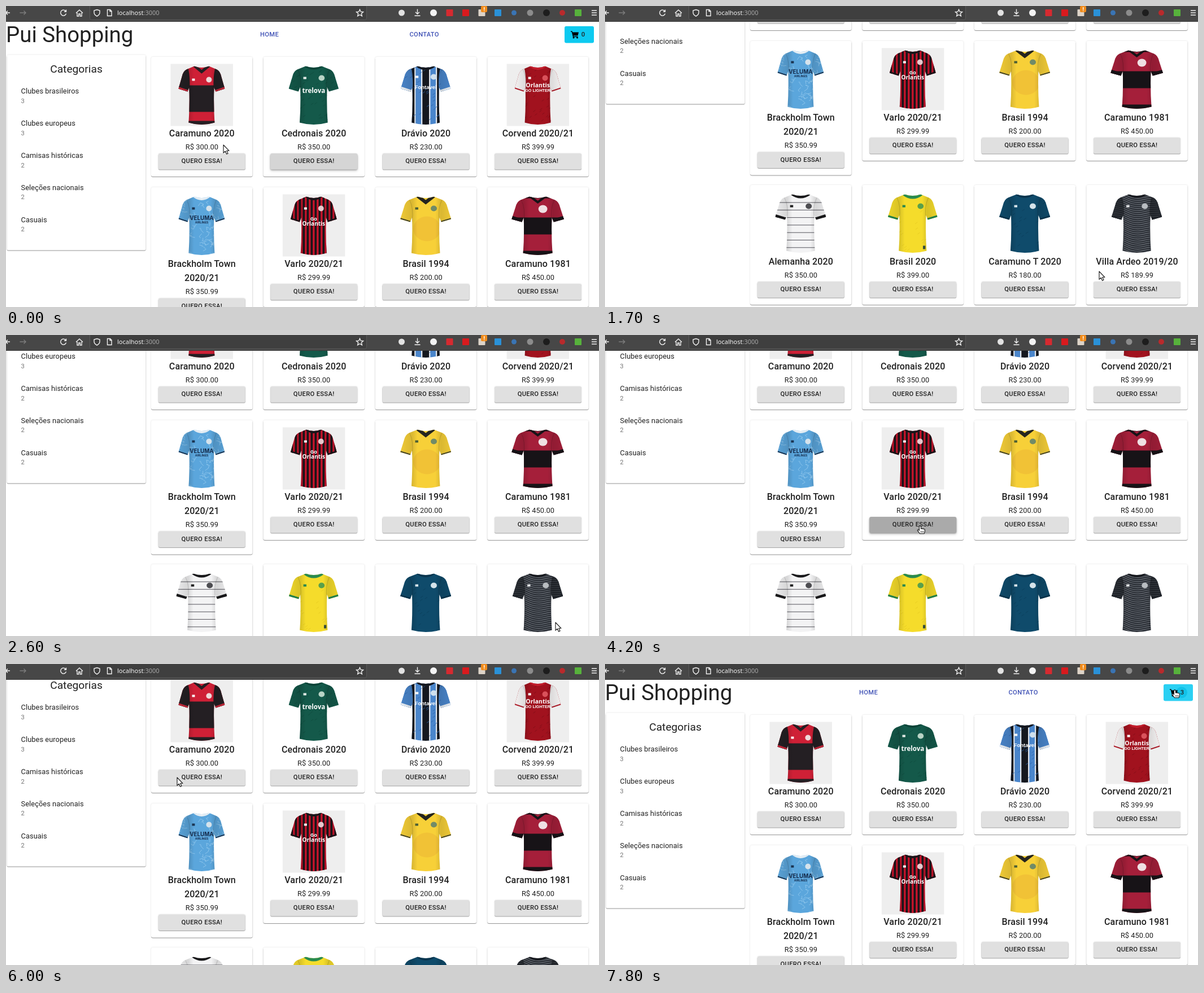
Write an HTML page that moves like this. It is 1050 by 533 pixels and loops after 8 s.

```html
<!DOCTYPE html>
<html lang="pt">
<head>
<meta charset="utf-8">
<title>Pui Shopping</title>
<style>
html,body{margin:0;width:100%;height:100%;overflow:hidden;background:#fff}
svg{display:block}
text{font-family:Roboto,sans-serif;fill:#212121;white-space:pre}
.mid{text-anchor:middle}
.brand{font-size:38.4px}
.head{font-size:19.2px}
.body{font-size:12.8px;letter-spacing:.07px}
.small{font-size:11.2px;fill:#757575}
.name{font-size:16px;font-weight:500;letter-spacing:.12px}
.btn{font-size:11.2px;font-weight:500;letter-spacing:.32px}
.link{fill:#3f51b5}
.paper{fill:#fff;filter:drop-shadow(0 1.2px .35px rgba(0,0,0,.36)) drop-shadow(0 .2px .8px rgba(0,0,0,.14))}
.key{filter:drop-shadow(0 1.3px .5px rgba(0,0,0,.3)) drop-shadow(0 .6px 1.2px rgba(0,0,0,.14))}
.up{filter:drop-shadow(0 1.6px 1px rgba(0,0,0,.3)) drop-shadow(0 2px 2.2px rgba(0,0,0,.18))}
.line{fill:none;stroke:#f2f2f2;stroke-width:1.4}
.url{font:11px "Noto Sans",sans-serif;fill:#f4f4f4}
</style>
</head>
<body>
<svg id="stage" width="1050" height="533" viewBox="0 0 1050 533">
  <defs>
    <clipPath id="cut"><path id="cutPath"/></clipPath>
    <linearGradient id="fold">
      <stop offset=".12" stop-opacity=".03"/><stop offset=".3" stop-opacity=".12"/>
      <stop offset=".38" stop-opacity="0"/><stop offset=".64" stop-opacity="0"/>
      <stop offset=".72" stop-opacity=".12"/><stop offset=".9" stop-opacity=".03"/>
    </linearGradient>
  </defs>
  <rect width="1050" height="533" fill="#fff"/>
  <g id="page"></g>
  <g id="bar"></g>
  <g id="arrow"><path d="M0 0V14.2L3.3 11.2L5.6 16.2L8 15.1L5.7 10.3H10Z" fill="#fff" stroke="#111" stroke-width="1.1" stroke-linejoin="round"/></g>
  <g id="hand"><path d="M-1.6 1Q0 -1.2 1.4 1V5Q2.8 4 3.8 5.3Q5.2 4.4 6.2 5.8Q8 5.3 8.3 7V10Q8 12 7 13.8H-.6Q-2 11.5-4.6 8.4Q-5 6.6-3.2 6.8L-1.6 8.2Z" fill="#fff" stroke="#111" stroke-width="1.1" stroke-linejoin="round"/><path d="M1.4 9v3M3.6 9v3M5.8 9v3" stroke="#111" stroke-width=".8"/></g>
</svg>
<script>
const $ = id => document.getElementById(id);
const rect = (x, y, w, h, fill, more = '') =>
  `<rect x="${x}" y="${y}" width="${w}" height="${h}" fill="${fill}" ${more}/>`;
const dot = (x, y, r, fill) => `<circle cx="${x}" cy="${y}" r="${r}" fill="${fill}"/>`;
const stroke = (d, color, w = 1, more = '') =>
  `<path d="${d}" fill="none" stroke="${color}" stroke-width="${w}" ${more}/>`;
// Baselines sit on whole pixels
const text = (x, y, cls, s, more = '') =>
  `<text x="${x}" y="${Math.round(y)}" class="${cls}" ${more}>${s}</text>`;
const repeat = (n, f) => Array.from({length: n}, (_, i) => f(i)).join('');

// Shirts are drawn in a 110 x 110 box
const SHIRT = 'M42 4Q55 9 68 4L82 10Q88 13 90 23L96 44L80 49L77 41Q76 75 78 104Q55 111 32 104Q34 75 33 41L30 49L14 44L20 23Q22 13 28 10Z';
$('cutPath').setAttribute('d', SHIRT);

const band = (y, h, c) => rect(0, y, 110, h, c);
const cuffs = (c, w = 4) => stroke('M12 42L31 48.5M98 42L79 48.5', c, w);
const collar = (c, w = 5) => stroke('M41 3Q55 14 69 3', c, w);
const vneck = (c, w = 4) => stroke('M42 3L55 14L68 3', c, w);
const marks = (a, b, y = 25) => rect(38, y - 2, 5, 4, a) + dot(68, y, 5, b);
const sleeves = c => `<path d="M29 0Q36 20 33 52H0V0ZM81 0Q74 20 77 52H110V0Z" fill="${c}"/>`;
const print = (y, size, s, fill = '#fff', font = 'Liberation Sans,sans-serif', more = '') =>
  `<text x="55" y="${y}" class="mid" style="font:bold ${size}px ${font};fill:${fill}" ${more}>${s}</text>`;

let seed = 7;
const rnd = () => (seed = seed * 16807 % 2147483647) / 2147483647;
const cracks = () => repeat(90, () => {
  const x = 14 + rnd() * 80, y = 8 + rnd() * 98, j = () => (rnd() * 12 - 6).toFixed(1);
  return stroke(`M${x.toFixed(1)} ${y.toFixed(1)}l${j()} ${j()}l${j()} ${j()}`, '#9fd0f1', .7);
});
const flecks = (c, n) => repeat(n, () =>
  stroke(`M${(rnd() * 100).toFixed(1)} ${(rnd() * 105).toFixed(1)}l4 -3`, c, .8));
const waves = () => repeat(36, i =>
  stroke(`M10 ${i * 3.6 - 8}q14 -5 28 3t28 4t36 -3`, '#9298a0', 1.1, 'opacity=".65"'));

const items = [
  {name: ['Caramuno 2020'], price: '300.00', w: 1, base: '#cf2036', bg: 1,
    art: sleeves('#241f23') + band(38, 47, '#241f23') + band(101, 10, '#241f23') + vneck('#241f23', 5) + cuffs('#c9283a', 4) + marks('#fff', '#eedada', 28)},
  {name: ['Cedronais 2020'], price: '350.00', w: 1.08, base: '#14594a',
    art: flecks('#0f4b3e', 90) + collar('#0c4438', 4) + marks('#e5eee9', '#b9d4c6'),
    label: print(51, 11.5, 'trelova', '#fff', 'Open Sans,sans-serif', 'font-style="italic"')},
  {name: ['Drávio 2020'], price: '230.00', w: 1.08, base: '#4a86cc',
    art: repeat(5, i => rect(24 * i - .5, 0, 15, 111, '#edf2f8') + rect(24 * i + 1.5, 0, 11, 111, '#15181f')) + sleeves('#4a86cc') + flecks('#2e66ac', 60) + cuffs('#eef3f8', 5) + collar('#15181f', 5) + marks('#fff', '#cfe0ee', 23),
    label: print(44, 9.5, 'Fontavel')},
  {name: ['Corvend 2020/21'], price: '399.99', w: 1, base: '#a1121e', bg: 1,
    art: flecks('#7e0d17', 90) + sleeves('#fbf9f9') + cuffs('#b41826', 2) + collar('#c31d2b', 4) + marks('#fff', '#d9525b'),
    label: print(41, 10.5, 'Orlantis', '#fff', 'Open Sans,sans-serif') + print(49, 7.2, 'GO LIGHTER')},
  {name: ['Brackholm Town', '2020/21'], price: '350.99', w: 1, base: '#5ba6dc',
    art: cracks() + collar('#e6eef4', 4) + cuffs('#1b3553', 2) + marks('#1b3553', '#d6e3ec'),
    label: print(45, 9.8, 'VELUMA', '#152c4c', 'Inter,sans-serif') + print(51, 5, 'AIRLINES', '#152c4c')},
  {name: ['Varlo 2020/21'], price: '299.99', w: 1, base: '#c4142b', bg: 1,
    art: repeat(12, i => rect(14.7 + i * 7, 0, 3.6, 111, '#191519')) + collar('#191519', 4) + cuffs('#191519', 3) + marks('#fff', '#e7c9cd'),
    label: print(46, 9, 'Go', '#fff', 'Open Sans,sans-serif') + print(55, 10, 'Orlantis', '#fff', 'Open Sans,sans-serif')},
  {name: ['Brasil 1994'], price: '200.00', w: 1.1, base: '#f7d038',
    art: `<g opacity=".6">${dot(57, 61, 22, '#efb936')}</g>` + vneck('#25251f', 6) + cuffs('#46472c', 2) + marks('#4e6135', '#718b67')},
  {name: ['Caramuno 1981'], price: '450.00', w: 1.13, base: '#a51f3a',
    art: band(0, 7, '#171317') + band(41, 30, '#171317') + band(100, 11, '#171317') + cuffs('#171317', 9) + vneck('#171317', 4) + dot(63, 26, 7, '#efe0e3')},
  {name: ['Alemanha 2020'], price: '350.00', w: 1.1, base: '#f3f3f4',
    art: repeat(7, i => band(18 + i * 13.3, 1, '#55545c')) + cuffs('#19191b', 7) + stroke('M12 45L31 51.5M98 45L79 51.5', '#c43740', 2) + collar('#19191b', 5) + marks('#222', '#4d4d51')},
  {name: ['Brasil 2020'], price: '399.00', w: 1.07, base: '#f5dc2b',
    art: flecks('#e6ca20', 35) + collar('#2a8b4f', 7) + cuffs('#248850', 4) + rect(72, 95, 4, 6, '#37503d') + marks('#2a8b4f', '#59a04b')},
  {name: ['Caramuno T 2020'], price: '180.00', w: 1.1, base: '#0f4b6b',
    art: flecks('#0b3e5b', 45) + collar('#0a354e', 4) + cuffs('#0a354e', 3) + marks('#dce8ee', '#d5e3ea')},
  {name: ['Villa Ardeo 2019/20'], price: '189.99', w: 1.09, base: '#2a2e35',
    art: waves() + sleeves('rgba(25,28,34,.55)') + collar('#17191e', 4) + cuffs('#22262c', 3) + marks('#e4e6e8', '#b9bdc1')}
];

const rowTop = [90, 321, 576];

function card(item, i) {
  const x = 257 + 198.4 * (i % 4), y = rowTop[i / 4 | 0], mid = 89.8;
  const extra = 25.4 * (item.name.length - 1), by = 171 + extra;
  const names = item.name.map((s, k) => text(mid, 141 + 25.4 * k, 'name mid', s)).join('');
  return `<g transform="translate(${x} ${y})">
    <rect class="paper" width="179.5" height="${212 + extra}" rx="3.2"/>
    <g transform="translate(34.4 12.5)">${item.bg ? rect(0, 0, 110.5, 110, '#eee') : ''}
      <g transform="translate(55 0) scale(${item.w} 1) translate(-55 0)"><g clip-path="url(#cut)">
        ${band(0, 111, item.base)}${item.art}${stroke('M29 10Q36 25 33 48M81 10Q74 25 77 48', '#000', .8, 'opacity=".2"')}
        ${band(0, 111, 'url(#fold)')}</g></g>${item.label || ''}</g>
    ${names}
    ${text(mid, 163.8 + extra, 'body mid', 'R$ ' + item.price)}
    <rect id="key${i}" class="key" x="12.8" y="${by}" width="154" height="28.6" rx="3.2" fill="#e0e0e0"/>
    ${text(mid, by + 17.2, 'btn mid', 'QUERO ESSA!')}</g>`;
}

const groups = [['Clubes brasileiros', 3], ['Clubes europeus', 3], ['Camisas históricas', 2], ['Seleções nacionais', 2], ['Casuais', 2]];

$('page').innerHTML =
  text(0, 64, 'brand', 'Pui Shopping') +
  text(450, 54, 'btn link', 'HOME') + text(714.5, 54, 'btn link', 'CONTATO') +
  '<rect id="cart" x="989" y="35.8" width="52" height="29.6" rx="3.2"/>' +
  '<g id="ripple">' + dot(1021, 50.5, 10, '#12c2e8') + '</g>' +
  '<path d="M1000 44.6h2.6l.6 1.8h10.8l-1.5 6h-7.6l.3 1.3h7.3v1.3h-8.6l-2.1-9.1h-1.8z"/>' +
  dot(1005, 56, 1.5, '#000') + dot(1011.5, 56, 1.5, '#000') +
  text(1022, 54, 'btn mid', '0', 'id="count"') +
  '<rect class="paper" x="1.6" y="86.4" width="246" height="346.2" rx="3.2"/>' +
  text(124.5, 118, 'head mid', 'Categorias') +
  groups.map(([s, n], i) => text(26.6, 155.4 + 56.8 * i, 'body', s) + text(26.6, 172 + 56.8 * i, 'small', n)).join('') +
  items.map(card).join('');

const square = (x, c) => rect(x - 6, 6, 12, 12, c, 'rx="1"');
$('bar').innerHTML =
  rect(0, 0, 1050, 28, '#474747') + rect(0, 27, 1050, 1, '#3c3c3c') +
  rect(148.5, -6, 490, 30.5, '#3f3f3f', 'rx="3" stroke="#5a5a5a"') +
  `<g class="line">
    <path d="M7 12H0M3 8.5L-.5 12L3 15.5"/>
    <path d="M24.5 12H35M31.5 8.5L35 12L31.5 15.5" stroke="#7d7d7d"/>
    <path d="M106 9.5A5 5 0 1 0 106.5 13.5M106.5 6.5V10H103"/>
    <path d="M124 12.5L130 7L136 12.5M126 12V18H128.7V14H131.3V18H134V12"/>
    <path d="M161 6.5L166 8V11.5Q166 15.5 161 18Q156 15.5 156 11.5V8Z"/>
    <path d="M179.5 6.5H184.5L187 9V17.5H179.5ZM184 6.5V9.5H187"/>
    <path d="M626.5 6.2L628.3 10.2L632.5 10.6L629.3 13.5L630.3 17.8L626.5 15.5L622.7 17.8L623.7 13.5L620.5 10.6L624.7 10.2Z"/>
    <path d="M728.5 5.5V14M725 10.8L728.5 14.3L732 10.8M723.5 17.3H733.5"/>
    <path d="M1037 8H1046M1037 12H1046M1037 16H1046"/>
  </g>` +
  text(197, 16, 'url', 'localhost<tspan fill="#a6a6a6">:3000</tspan>') +
  dot(700.5, 12, 5.5, '#e2e2e2') + dot(757, 12, 6, '#f3f3f3') + square(785.5, '#d62a30') +
  square(814, '#d81a1e') + square(842.5, '#ddd3c8') + rect(841, 0, 11, 11, '#f08c1d', 'rx="2"') +
  rect(846, 2, 1.4, 4.8, '#fff') + rect(846, 7.8, 1.4, 1.4, '#fff') +
  square(871, '#2a91d8') + dot(899.5, 12, 4.5, '#3a74b4') + dot(928, 12, 5.5, '#8c8c8c') +
  dot(957, 12, 6, '#1d1d1d') + dot(985, 12, 5, '#b92a2c') + square(1013, '#57b23c');

// [time, scroll, x, y, glide]
const track = [
  [0, 0, 385, 246], [100, 0, 368, 241], [400, 0, 605, 275], [600, 48, 560, 268],
  [800, 196, 521, 262], [1700, 259, 875, 470, 1], [2500, 211, 914, 416, 1], [2600, 170, 973, 509],
  [4200, 170, 558, 338], [4400, 170, 603, 332, 1], [4600, 170, 714, 332], [5600, 170, 407, 340],
  [5800, 170, 302, 200], [6000, 74, 303, 201], [6100, 30, 322, 220], [6300, 0, 350, 250, 1],
  [6500, 0, 356, 273], [7200, 0, 1034, 48], [7400, 0, 1030, 51], [7600, 0, 1009, 46]
];
const hands = [[400, 600], [4200, 5600], [6500, 7200], [7600, 8000]];
const REST = '#e0e0e0', HOVER = '#d5d5d5', DOWN = '#aaa';
const tints = {
  0: [[6700, HOVER], [7000, DOWN], [7200, '#c2c2c2'], [7400, HOVER], [7600, REST]],
  1: [[0, HOVER], [100, REST]],
  5: [[4200, DOWN], [4300, '#bdbdbd'], [4400, HOVER], [4800, REST]],
  6: [[4800, HOVER], [5000, DOWN], [5600, HOVER], [5800, REST]]
};
const lastBefore = (list, t) => list.findLastIndex(k => k[0] <= t);

function pose(t) {
  const i = lastBefore(track, t), a = track[i], b = track[i + 1];
  const p = b && b[4] ? (t - a[0]) / (b[0] - a[0]) : 0;
  return [1, 2, 3].map(k => p ? Math.round(a[k] + (b[k] - a[k]) * p) : a[k]);
}

function draw(ms) {
  const t = Math.floor(ms / 100) * 100;
  const [scroll, x, y] = pose(t);
  const hand = hands.some(([a, b]) => t >= a && t < b);
  $('page').setAttribute('transform', `translate(0 ${-scroll})`);
  for (const id of ['arrow', 'hand']) {
    $(id).setAttribute('transform', `translate(${x} ${y})`);
    $(id).setAttribute('display', (id === 'hand') === hand ? 'inline' : 'none');
  }
  for (const i in tints) {
    const k = lastBefore(tints[i], t), c = k < 0 ? REST : tints[i][k][1];
    $('key' + i).setAttribute('fill', c);
    $('key' + i).setAttribute('class', c === REST ? 'key' : 'up');
  }
  $('cart').setAttribute('fill', t < 7600 ? '#0dcaf0' : '#2bd0f3');
  $('ripple').setAttribute('display', t < 7800 ? 'none' : 'inline');
  $('count').textContent = [4200, 5000, 7200].filter(k => t >= k).length;
}

let start;
function tick(now) {
  start ??= now;
  draw((now - start) % 8000);
  requestAnimationFrame(tick);
}
draw(0);
requestAnimationFrame(tick);
</script>
</body>
</html>
```
